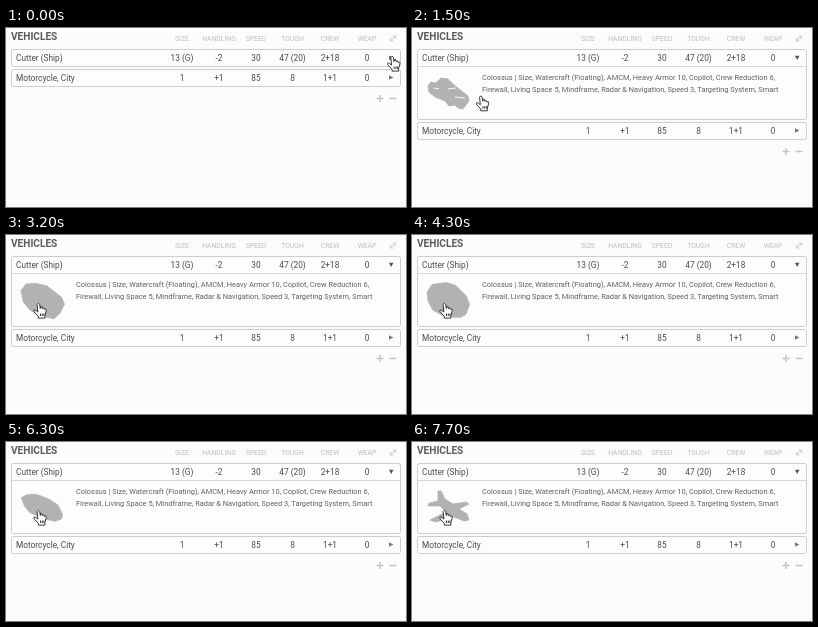
These frames come from a looping animation (400 by 179 pixels, 8000 ms). An HTML page:

```html
<!DOCTYPE html>
<html lang="en">
<head>
<meta charset="utf-8">
<title>Vehicles</title>
<style>
  html, body { margin: 0; width: 100%; height: 100%; overflow: hidden; background: #fdfbfe; }
  svg { display: block; width: 400px; height: 179px; font-family: Roboto, Arial, sans-serif; }
  .title { font-size: 10.1px; font-weight: 700; fill: #5c5a5d; }
  .head { font-size: 6.8px; fill: #bfbcc0; text-anchor: middle; }
  .cell { font-size: 8.3px; fill: #4c4a4d; }
  .mid { text-anchor: middle; }
  .notes { font-size: 7.43px; fill: #605e61; }
  .box { fill: #fefcff; stroke: #cfccd0; }
  .icon { fill: #b3b1b4; stroke: #b3b1b4; stroke-width: .8; stroke-linejoin: round; }
  .sign { fill: none; stroke: #c6c3c7; stroke-width: 1.5; }
</style>
</head>
<body>
<svg viewBox="0 0 400 179">
  <text class="title" x="5" y="12.3">VEHICLES</text>
  <g id="heads"></g>
  <path d="M384.5 13l5-5m-3 0h3v3m-5-1v3h3" fill="none" stroke="#bfbcc0" stroke-width=".8"/>

  <g id="row1"></g>
  <g id="details">
    <path d="M6 38.5h388" stroke="#dad7db"/>
    <text class="notes" x="70" y="52.2">Colossus | Size, Watercraft (Floating), AMCM, Heavy Armor 10, Copilot, Crew Reduction 6,</text>
    <text class="notes" x="70" y="64.2">Firewall, Living Space 5, Mindframe, Radar &amp; Navigation, Speed 3, Targeting System, Smart</text>
    <path id="icon" class="icon"/>
    <path id="windows" d="M36 61l8-1M43 69l10 1M22 60l5 1" stroke="#fdfbfe"/>
  </g>
  <path id="arrow" d="M-2-2.3L2.4 0-2 2.3z" fill="#555"/>

  <g id="below">
    <g id="row2"></g>
    <path d="M383 47.2l4.4 2.3-4.4 2.3z" fill="#777"/>
    <path class="sign" d="M370.5 70.5h7M374 67v7m9.5-3.5h7"/>
  </g>

  <circle id="press" r="26" fill-opacity=".12"/>
  <path id="hand" fill="#fff" stroke="#222" stroke-width=".9" stroke-linejoin="round"
    d="M-1.2 1Q0-1.6 1.4 1L2 5Q3-.1 4.1 5.2 5.5 3 6.1 5.8 8 4.8 8 7L6.6 12v2.6H0v-1.8l-4.2-4.4Q-5 5.4-2.3 7L-.4 8.6Z
       M2.2 10v2.5M4 10v2.5m1.6-2.5v2.5"/>
</svg>
<script>
const $ = id => document.getElementById(id);
const LOOP = 8000, OPEN = 600, SHIFT = 53;
const columns = [176, 213, 250, 286.5, 324, 361];

const label = (cls, x, y, s) => `<text class="${cls}" x="${x}" y="${y}">${s}</text>`;
const across = (cls, y, list) => list.map((s, i) => label(cls, columns[i], y, s)).join("");
const row = (y, name, values) =>
  `<rect class="box" x="5.5" y="${y}" width="389" height="17" rx="2"/>` +
  label("cell", 10, y + 11.5, name) + across("cell mid", y + 11.5, values);

$("heads").innerHTML = across("head", 13.3, ["SIZE", "HANDLING", "SPEED", "TOUGH", "CREW", "WEAP"]);
$("row1").innerHTML = row(21.5, "Cutter (Ship)", ["13 (G)", "-2", "30", "47 (20)", "2+18", "0"]);
$("row2").innerHTML = row(41.5, "Motorcycle, City", ["1", "+1", "85", "8", "1+1", "0"]);

const car = "M16 58l3-4 5 1 5-5 7 1 6 6 14 11 1 5-6 8-5-1-3-3-6 1-4-5-10-4-6-5Z";
const plane = "M26 49h3l4 8 8 5 13-2 3 2-10 5 8 5 2 6-5 1-10-4-18 5-6-2 16-8-6-6H16l1-3 9-2Z";

const random = n => { const s = Math.sin(n * 127.1) * 43758.5; return s - Math.floor(s); };

// Rough hull: a tilted ellipse with seeded corners
function hull(n) {
  const tilt = 0.49, depth = 13 + 3 * Math.cos((n - 4) * 0.85);
  const points = Array.from({ length: 11 }, (_, i) => {
    const a = (i + 0.5 * random(n + i / 11)) / 11 * 2 * Math.PI;
    const r = 0.92 + 0.16 * random(n * 3 + i);
    const u = 23 * r * Math.cos(a), v = depth * r * Math.sin(a);
    return [36.5 + u * Math.cos(tilt) - v * Math.sin(tilt), 65.5 + u * Math.sin(tilt) + v * Math.cos(tilt)];
  });
  return "M" + points.join("L") + "Z";
}

// Vehicles change at a steady pace; the first swap comes early
const vehicle = t => t < 2100 ? 0 : Math.max(1, 2 + Math.floor((t - 2400) / 714));
const shape = n => n === 0 ? car : n === 9 ? plane : hull(n);

// Clicks on the picture, in tenths of a second
const clicks = [19, 26, 34, 42, 49, 56, 62, 69, 76];
const pressed = t => t >= 400 && t < OPEN + 100 || clicks.includes(Math.floor(t / 100));

const place = (id, x, y, turn = 0) =>
  $(id).setAttribute("transform", `translate(${x} ${y}) rotate(${turn})`);
const show = (id, on) => $(id).style.display = on ? "" : "none";

function draw(t) {
  const open = t >= OPEN, n = vehicle(t);
  show("details", open);
  $("row1").firstChild.setAttribute("height", open ? 17 + SHIFT : 17);
  place("below", 0, open ? SHIFT : 0);
  place("arrow", 385.2, 29.7, open ? 90 : 0);

  $("icon").setAttribute("d", shape(n));
  show("windows", n === 0);

  const k = Math.min(1, Math.max(0, (t - 700) / 1000));
  const x = 386 - 353.7 * k * k * (3 - 2 * k);
  const y = 28.5 + 40 * (1 - (1 - k) ** 3);
  place("hand", x, y);
  place("press", x, y);
  show("press", pressed(t));
}

const begin = performance.now();
function tick() {
  draw((performance.now() - begin) % LOOP);
  requestAnimationFrame(tick);
}
tick();
</script>
</body>
</html>
```
